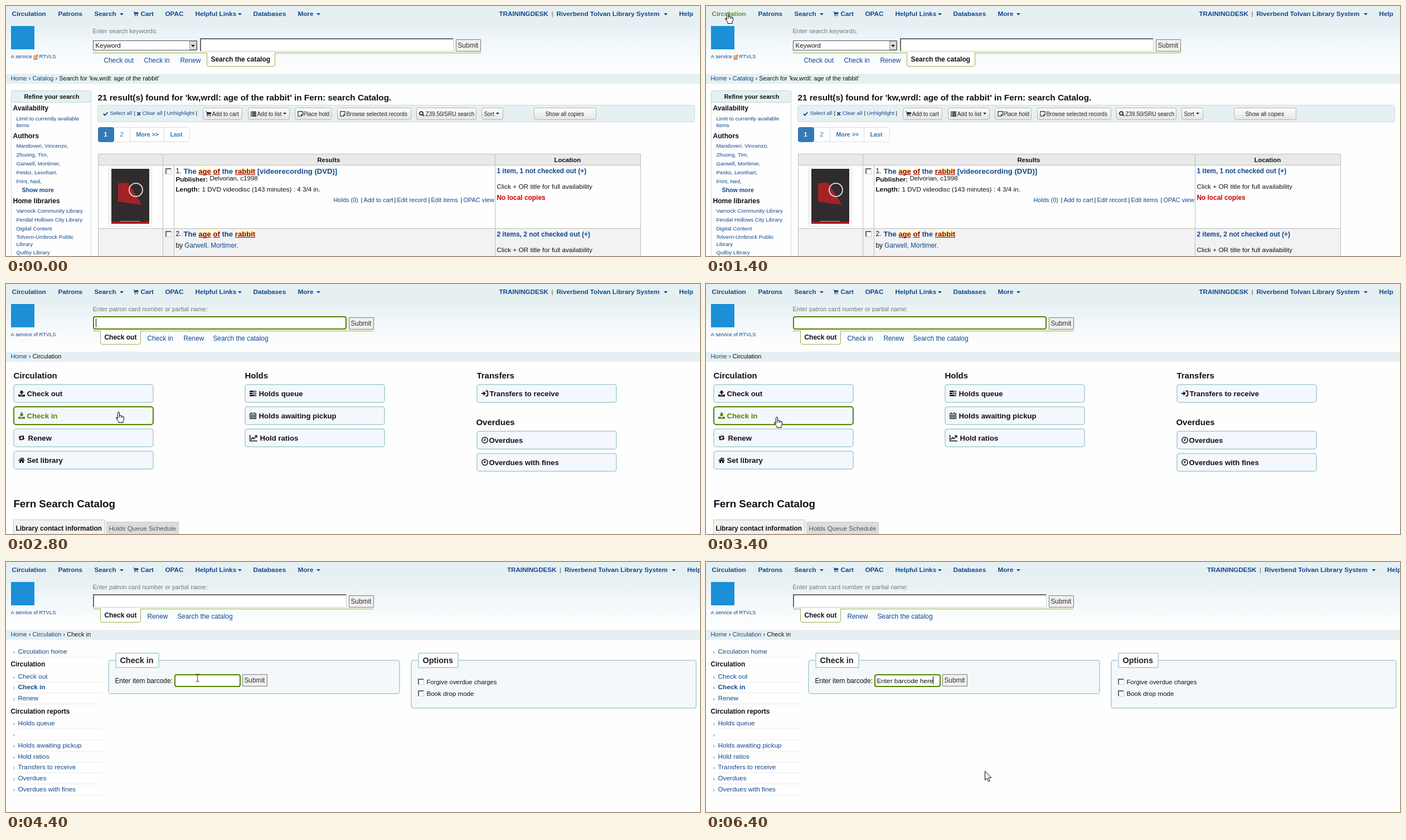
These frames come from a looping animation (1245 by 450 pixels, 6.6 s). An HTML page with a canvas:

```html
<!DOCTYPE html>
<html lang="en">
<head>
<meta charset="utf-8">
<title>Library check in</title>
<style>
html, body { margin: 0; width: 100%; height: 100%; overflow: hidden; background: #fefefe; }
canvas { display: block; }
</style>
</head>
<body>
<canvas id="stage" width="1245" height="450"></canvas>
<script>
const c = document.getElementById('stage').getContext('2d');
const LOOP = 6600, STEP = 200;
const LINK = '#10488c', GREEN = '#538200', INK = '#111', TEAL = '#b9d8d9', PALE = '#e6f0f2';

// Icons live in a 12 unit box: [path, stroke width or 0 for fill]
const ICONS = {
  check: ['M1 6L4.5 9.5L11 2.5', 2.6],
  cross: ['M2 2L10 10M10 2L2 10', 2.8],
  cart: ['M0 1H2.6L3 2.6H12V6.5L4 7.4L4.2 8.4H11V9.4H3.2L1.9 2H0ZM3.6 10H5.4V11.8H3.6ZM9 10H10.8V11.8H9Z', 0],
  list: ['M0 1H2V3H0ZM3 1H12V3H3ZM0 4H2V6H0ZM3 4H12V6H3ZM0 7H2V9H0ZM3 7H12V9H3ZM0 10H2V12H0ZM3 10H12V12H3Z', 0],
  note: ['M1 1H11V8L8 11H1ZM11 8H8V11', 1.3],
  search: ['M8.5 5a3.7 3.7 0 1 1-7.4 0a3.7 3.7 0 1 1 7.4 0M7.7 7.8L11 11', 2],
  upload: ['M6 0L10 4.5H7.5V8H4.5V4.5H2ZM0 8H3.5V9.3H8.5V8H12V11.5H0Z', 0],
  download: ['M4.5 0H7.5V3.5H10L6 8L2 3.5H4.5ZM0 8H3.5L6 10L8.5 8H12V11.5H0Z', 0],
  renew: ['M3 2L0 5.5H2V10H8L6.6 8.3H4V5.5H6ZM9 10L12 6.5H10V2H4L5.4 3.7H8V6.5H6Z', 0],
  home: ['M6 1L0 6.4L.8 7.2L6 2.7L11.2 7.2L12 6.4L10 4.6V1.8H8.6V3.4ZM6 3.6L2 7.2V11H5V8H7V11H10V7.2Z', 0],
  tasks: ['M0 1H12V3.6H0ZM7 1.8V2.8H11.2V1.8ZM0 4.7H12V7.3H0ZM5 5.5V6.5H11.2V5.5ZM0 8.4H12V11H0ZM8.5 9.2V10.2H11.2V9.2Z', 0],
  calendar: ['M.7 2H11.3V11.3H.7ZM.7 5H11.3M.7 8H11.3M4.2 4V11M7.8 4V11M3.5 0V3M8.5 0V3', 1.2],
  chart: ['M.6 1V11H12.8M2.2 8.5L5 5.5L7 7.5L11.5 2.8M8.6 2.4H11.8V5.6', 1.4],
  enter: ['M0 6H6M3.5 3L6.5 6L3.5 9M7.5 1.5H9.8Q11.3 1.5 11.3 3V9Q11.3 10.5 9.8 10.5H7.5', 1.8],
  clock: ['M11.2 6a5.2 5.2 0 1 1-10.4 0a5.2 5.2 0 1 1 10.4 0M6.3 3V6.6H3.8', 1.5]
};
const CURSORS = {
  hand: 'M-2 12V1.5Q-2 0 -.5 0Q1 0 1 1.5V7Q1 6 2.5 6Q4 6 4 7.5Q4 6.8 5.3 6.8Q6.6 6.8 6.6 8.3Q6.8 7.7 7.8 7.8Q9 8 9 9.3V13L7.5 16V19H-.5V17L-5 11Q-5.5 9.3 -4 9.3Z',
  arrow: 'M0 0V16L3.7 12.6L6.2 18.4L8.8 17.3L6.3 11.6H11.3Z',
  beam: 'M-3 -7Q0 -7 0 -5Q0 -7 3 -7M0 -5V6M-3 7Q0 7 0 5Q0 7 3 7'
};

function rect(x, y, w, h, fill) {
  c.fillStyle = fill;
  c.fillRect(x, y, w, h);
}

function box(x, y, x2, y2, fill, line, lw = 1, r = 0) {
  c.beginPath();
  c.roundRect(x + lw / 2, y + lw / 2, x2 - x - lw, y2 - y - lw, r);
  c.fillStyle = fill;
  c.fill();
  c.strokeStyle = line;
  c.lineWidth = lw;
  c.stroke();
}

// Draws text centred on y and returns its right edge
function text(s, x, y, size, color = INK, bold = false) {
  c.font = `${bold ? 'bold ' : ''}${size}px "Liberation Sans", Arial, sans-serif`;
  c.fillStyle = color;
  c.fillText(s, x - 0.6, Math.round(y + size * 0.35));
  return x + c.measureText(s).width;
}

function term(s, x, y, size, bold = true) {
  c.font = `${bold ? 'bold ' : ''}${size}px "Liberation Sans", Arial, sans-serif`;
  const w = c.measureText(s).width, h = size + 1;
  rect(x - 0.6, y - h / 2, w, h, '#ffffcc');
  text(s, x, y, size, '#990000', bold);
  rect(x - 0.6, Math.round(y + size * 0.35) + 1, w, 1, '#990000');
  return x + w;
}

function icon(name, x, y, size, color) {
  const [d, lw] = ICONS[name], p = new Path2D(d);
  c.save();
  c.translate(x, y - size / 2);
  c.scale(size / 12, size / 12);
  c.fillStyle = c.strokeStyle = color;
  c.lineWidth = lw;
  lw ? c.stroke(p) : c.fill(p, 'evenodd');
  c.restore();
}

function caret(x, y, color, w = 7) {
  c.beginPath();
  c.moveTo(x, y);
  c.lineTo(x + w, y);
  c.lineTo(x + w / 2, y + w / 2 + 0.3);
  c.fillStyle = color;
  c.fill();
}

function sunken(x, y, x2, y2) {
  rect(x, y, x2 - x, y2 - y, '#ccc');
  rect(x, y, x2 - x - 1, y2 - y - 1, '#666');
  rect(x + 2, y + 2, x2 - x - 3, y2 - y - 3, '#fff');
}

function field(x, y, x2, y2, focus) {
  focus ? box(x, y, x2, y2, '#fff', GREEN, 2, 3) : sunken(x, y, x2, y2);
}

function submit(x, y) {
  box(x, y, x + 45, y + 22, '#f0f0f0', '#7a7a7a');
  text('Submit', x + 4, y + 11, 11.9, '#333');
}

function checkbox(x, y) {
  sunken(x, y, x + 11, y + 11);
}

function header(page, hot) {
  const g = c.createLinearGradient(0, 0, 0, 115);
  g.addColorStop(0, '#e6f0f2');
  g.addColorStop(0.28, '#e6f0f3');
  g.addColorStop(0.62, '#f3f8fb');
  g.addColorStop(1, '#fefefe');
  rect(0, 0, 1245, 115, g);
  rect(0, 122, 1245, 18, PALE);
  [['Circulation', 11], ['Patrons', 94], ['Search', 159], ['Cart', 242], ['OPAC', 286],
   ['Helpful Links', 340], ['Databases', 444], ['More', 524]].forEach(([s, x], i) =>
    text(s, x, 14, 11.75, hot && !i ? '#6b8a26' : LINK, true));
  [204, 416, 557].forEach(x => caret(x, 13, LINK));
  icon('cart', 228, 14, 9.5, LINK);
  const dx = page === 2 ? 14.5 : 0;
  text('TRAININGDESK', 885 + dx, 14, 11.65, LINK, true);
  text('|', 979 + dx, 14, 11.65, '#555');
  text('Riverbend Tolvan Library System', 988 + dx, 14, 11.7, LINK, true);
  caret(1180 + dx, 13, LINK);
  text('Help', 1208 + dx, 14, 11.75, LINK, true);

  rect(9, 36, 42, 42, '#1c8fd6');
  let x = text('A service ', 9, 91, 9.3, LINK);
  x = page ? text('of', x, 91, 9.3, LINK) : term('of', x, 91, 9.3, false);
  text(' RTVLS', x, 91, 9.3, LINK);
}

// Search strip: its line, the open tab and the plain tabs
function tabs(right, open, others) {
  const [name, x, x2] = open, line = '#93b04a';
  rect(156, 84, right - 156, 1, line);
  c.beginPath();
  c.moveTo(x + 0.5, 84);
  c.lineTo(x + 0.5, 105);
  c.quadraticCurveTo(x + 0.5, 108.5, x + 4, 108.5);
  c.lineTo(x2 - 4, 108.5);
  c.quadraticCurveTo(x2 - 0.5, 108.5, x2 - 0.5, 105);
  c.lineTo(x2 - 0.5, 84);
  c.fillStyle = '#fefefe';
  c.fill();
  c.strokeStyle = line;
  c.lineWidth = 1;
  c.stroke();
  text(name, x + 8, 96, 12, INK, true);
  others.forEach(([s, tx]) => text(s, tx, 98, 11.9, LINK));
}

function crumbs(parts) {
  let x = 9;
  parts.forEach((s, i) => {
    const last = i === parts.length - 1;
    x = text(s, x, 130, 11, last ? INK : LINK);
    if (!last) x = text(' › ', x, 130, 11);
  });
}

function patronSearch(focus) {
  text('Enter patron card number or partial name:', 156, 45, 11.1, '#777');
  field(156, 58, 611, 82, focus);
  submit(615, 60);
}

function grayButton(x, x2, label, tx, ic) {
  const g = c.createLinearGradient(0, 183, 0, 205);
  g.addColorStop(0, '#fefefe');
  g.addColorStop(1, '#e4e4e4');
  box(x, 183, x2, 205, g, '#b4b4b4', 1, 3);
  if (ic) icon(ic, x + 5, 194, 10, '#222');
  return text(label, tx, 194, 10, '#222');
}

function cover() {
  box(184, 289, 262, 397, '#fff', '#ddd', 1, 4);
  rect(189, 293, 68, 99, '#302c2d');
  c.fillStyle = '#a32226';
  c.beginPath();
  c.moveTo(201, 319); c.lineTo(219, 318); c.lineTo(244, 358); c.lineTo(201, 352);
  c.fill();
  c.strokeStyle = '#d8d2d0';
  c.lineWidth = 2;
  c.beginPath();
  c.arc(233, 331, 12, 0, 7);
  c.stroke();
  rect(189, 388, 68, 4, '#a8181c');
  rect(204, 387, 36, 1, '#aaa');
}

function sidebar() {
  box(9, 152, 153, 460, '#fefefe', '#cfe0e2', 1, 4);
  box(9, 152, 153, 174, PALE, TEAL, 1, 3);
  text('Refine your search', 33, 163, 11, INK, true);
  [['Availability', 184], ['Authors', 234], ['Home libraries', 351]]
    .forEach(([s, y]) => text(s, 13, y, 12.15, INK, true));
  [['Limit to currently available', 203], ['items', 215],
   ['Mandoveri, Vincenzo,', 252], ['Zhuong, Tim,', 268], ['Garwell, Mortimer,', 284],
   ['Pesko, Leonhart,', 300], ['Frint, Ned,', 316],
   ['Varnock Community Library', 369], ['Fendal Hollows City Library', 385],
   ['Digital Content', 401], ['Tolvern-Umbrock Public', 416], ['Library', 429],
   ['Quilby Library', 444]].forEach(([s, y]) => text(s, 19, y, 9.75, LINK));
  text('Show more', 29, 331, 10.7, LINK, true);
}

function titleLine(n, y, tail) {
  const size = 13.1;
  let x = text(n, 305, y, 12);
  x = text('The ', 319, y, size, LINK, true);
  x = term('age', x, y, size);
  x = text(' ', x, y, size);
  x = term('of', x, y, size);
  x = text(' the ', x, y, size, LINK, true);
  x = term('rabbit', x, y, size);
  text(tail, x, y, size, LINK, true);
}

function results(s) {
  header(0, s.hot);
  text('Enter search keywords:', 156, 45, 11.1, '#777');
  box(156, 62, 343, 80, '#fff', '#555');
  text('Keyword', 161, 71, 11.7);
  box(329, 63, 342, 79, '#dcdcdc', '#999');
  caret(332, 70, '#000');
  field(348, 58, 803, 82);
  submit(807, 60);
  tabs(852, ['Search the catalog', 360, 483], [['Check out', 176], ['Check in', 248], ['Renew', 313]]);
  crumbs(['Home', 'Catalog', "Search for 'kw,wrdl: age of the rabbit'"]);
  sidebar();
  text("21 result(s) found for 'kw,wrdl: age of the rabbit' in Fern: search Catalog.", 165, 165, 15.3, INK, true);

  box(164, 178, 1236, 209, PALE, '#c4dddf', 1, 3);
  icon('check', 174, 194, 9, LINK);
  text('Select all', 187, 193, 9.8, LINK);
  text('|', 230, 193, 9.8);
  icon('cross', 234, 194, 8.5, LINK);
  text('Clear all', 245, 193, 9.8, LINK);
  text('|', 284, 193, 9.8);
  text('Unhighlight', 289, 193, 9.9, LINK);
  text('|', 341, 193, 9.8);
  grayButton(353, 424, 'Add to cart', 370, 'cart');
  grayButton(434, 509, 'Add to list', 451, 'list');
  caret(497, 192, '#222', 6);
  grayButton(518, 584, 'Place hold', 534, 'note');
  grayButton(594, 727, 'Browse selected records', 611, 'note');
  grayButton(736, 844, 'Z39.50/SRU search', 753, 'search');
  grayButton(853, 892, 'Sort', 858);
  caret(879, 192, '#222', 6);
  grayButton(947, 1059, 'Show all copies', 968);

  box(165, 218, 330, 245, '#fefefe', '#ddd', 1, 4);
  box(165, 218, 194, 245, '#337ab7', '#337ab7', 1, 3);
  rect(222, 219, 1, 25, '#ddd');
  rect(283, 219, 1, 25, '#ddd');
  text('1', 176, 231, 11, '#fff', true);
  text('2', 205, 231, 11, '#337ab7');
  text('More >>', 234, 231, 10.6, '#337ab7', true);
  text('Last', 295, 231, 10.8, '#337ab7', true);

  const line = '#bdbdbd';
  rect(165, 266, 974, 21, '#e9e9ea');
  rect(165, 401, 974, 49, '#f2f2f4');
  [266, 286, 400].forEach(y => rect(165, y, 974, 1, line));
  [165, 281, 877, 1138].forEach(x => rect(x, 266, 1, 184, line));
  rect(301, 287, 1, 163, line);
  text('Results', 559, 277, 11.3, INK, true);
  text('Location', 984, 277, 11.5, INK, true);
  cover();
  checkbox(286, 292);
  checkbox(286, 405);

  titleLine('1.', 297, ' [videorecording (DVD)]');
  text('Publisher:', 305, 312, 11.8, INK, true);
  text('Delvorian, c1998', 366, 310, 11.5);
  text('Length:', 305, 330, 11.8, INK, true);
  text('1 DVD videodisc (143 minutes) : 4 3/4 in.', 352, 330, 11.7);
  [['Holds (0)', 588], ['Add to cart', 642], ['Edit record', 702], ['Edit items', 763], ['OPAC view', 821]]
    .forEach(([t, x], i) => {
      text(t, x, 349, 11, LINK);
      if (i) text('|', x - 5, 349, 11);
    });
  titleLine('2.', 410, '');
  const x = text('by ', 305, 431, 11.9);
  text('Garwell, Mortimer.', x, 431, 11.9, LINK);

  text('1 item, 1 not checked out (+)', 881, 297, 11.95, LINK, true);
  text('Click + OR title for full availability', 881, 325, 11.8);
  text('No local copies', 881, 345, 11.9, '#c00', true);
  text('2 items, 2 not checked out (+)', 881, 411, 11.95, LINK, true);
  text('Click + OR title for full availability', 881, 439, 11.8);
}

// [x, y, height, label, icon, label x]
const MENU = [
  [13, 180, 34, 'Check out', 'upload', 38], [13, 220, 34, 'Check in', 'download', 38],
  [13, 260, 34, 'Renew', 'renew', 40], [13, 300, 34, 'Set library', 'home', 38],
  [428, 180, 34, 'Holds queue', 'tasks', 454], [428, 220, 34, 'Holds awaiting pickup', 'calendar', 454],
  [428, 260, 34, 'Hold ratios', 'chart', 456],
  [844, 180, 34, 'Transfers to receive', 'enter', 868],
  [844, 264, 34, 'Overdues', 'clock', 867], [844, 304, 34, 'Overdues with fines', 'clock', 867]
];
const over = ([x, y, h], p) => p[0] > x && p[0] < x + 252 && p[1] > y && p[1] < y + h;

function circulation(s) {
  header(1, s.hot);
  patronSearch(s.t < 3600);
  if (s.blink) rect(161, 62, 1, 16, '#000');
  tabs(659, ['Check out', 169, 242], [['Check in', 254], ['Renew', 319], ['Search the catalog', 372]]);
  crumbs(['Home', 'Circulation']);
  [['Circulation', 14, 165], ['Holds', 429, 165], ['Transfers', 845, 165], ['Overdues', 844, 249]]
    .forEach(([t, x, y]) => text(t, x, y, 15, INK, true));
  MENU.forEach(m => {
    const [x, y, h, label, ic, tx] = m, hot = over(m, s.pos), color = hot ? GREEN : INK;
    box(x, y, x + 252, y + h, '#f4f8fe', hot ? GREEN : TEAL, 2, 4);
    icon(ic, x + 9, y + 17, ic === 'chart' ? 13 : 12, color);
    text(label, tx, y + 17, 13.2, color, true);
  });
  text('Fern Search Catalog', 14, 395, 18.8, INK, true);
  box(13, 424, 178, 460, '#f3f1ee', '#c6c6c6');
  text('Library contact information', 18, 440, 11.9, INK, true);
  box(180, 428, 310, 460, '#dcdcde', '#cacaca');
  text('Holds Queue Schedule', 185, 440, 11.75, '#555');
}

function panel(x, x2, y2, title, lx, lx2) {
  box(x, 176, x2, y2, '#f4f8fb', TEAL, 2, 4);
  box(lx, 163, lx2, 191, '#fefefe', TEAL, 2, 2);
  text(title, lx + 9, 177, 14.45, '#222', true);
}

function checkIn(s) {
  header(2);
  patronSearch(false);
  tabs(659, ['Check out', 169, 242], [['Renew', 254], ['Search the catalog', 308]]);
  crumbs(['Home', 'Circulation', 'Check in']);
  text('Circulation', 9, 184, 11.85, INK, true);
  text('Circulation reports', 9, 269, 11.85, INK, true);
  [['Circulation home', 161], ['Check out', 206], ['Check in', 225], ['Renew', 245],
   ['Holds queue', 290], ['', 310], ['Holds awaiting pickup', 330], ['Hold ratios', 350],
   ['Transfers to receive', 369], ['Overdues', 389], ['Overdues with fines', 409]]
    .forEach(([t, y]) => {
      text('›', 13, y + 1, 11, '#777');
      text(t, 22, y, 11.8, LINK, t === 'Check in');
      rect(21, y + 10, 151, 1, '#ebebeb');
    });

  panel(183, 707, 238, 'Check in', 196, 275);
  text('Enter item barcode:', 196, 214, 11.85);
  field(302, 202, 421, 225, true);
  const end = text('Enter barcode here'.slice(0, s.typed), 307, 214, 11.8);
  if (s.typed) rect(Math.round(end - 0.5), 206, 1, 14, '#000');
  submit(424, 202);
  panel(726, 1239, 264, 'Options', 739, 812);
  checkbox(739, 210);
  checkbox(739, 231);
  text('Forgive overdue charges', 755, 216, 11.4);
  text('Book drop mode', 755, 237, 11.6);
}

const smooth = k => k * k * (3 - 2 * k);

// Interpolates [time, value...] keys
function track(keys, t, ease = smooth) {
  const i = keys.findIndex(k => k[0] > t);
  if (i === 0) return keys[0].slice(1);
  if (i < 0) return keys[keys.length - 1].slice(1);
  const a = keys[i - 1], b = keys[i], k = ease((t - a[0]) / (b[0] - a[0]));
  return a.slice(1).map((v, j) => v + (b[j + 1] - v) * k);
}

const MOUSE = [[600, 300, 230], [1400, 39, 12], [2200, 39, 12], [2800, 202, 230], [3400, 127, 239], [4200, 127, 239]];
const MOUSE_IN_FORM = [[4400, 343, 208], [4600, 343, 208], [5200, 500, 376]];
const TYPING = [[4800, 0], [5400, 6], [5600, 6], [6400, 18]];

function pointer(kind, [x, y]) {
  const p = new Path2D(CURSORS[kind]);
  c.save();
  c.translate(Math.round(x) + 0.5, Math.round(y) + 0.5);
  c.lineWidth = 1;
  c.lineJoin = 'round';
  c.strokeStyle = kind === 'beam' ? '#333' : '#000';
  c.fillStyle = '#fff';
  if (kind !== 'beam') c.fill(p);
  c.stroke(p);
  if (kind === 'hand') c.stroke(new Path2D('M1 7V10M4 8V10.5M6.6 8.5V10.5'));
  c.restore();
}

function draw(t) {
  const page = t < 2000 ? 0 : t < 4400 ? 1 : 2;
  const pos = track(page === 2 ? MOUSE_IN_FORM : MOUSE, t);
  const hot = t >= 600 && pos[0] < 75 && pos[1] < 24;
  const state = {
    t, pos, hot,
    blink: t >= 2400 && t < 3000,
    typed: Math.round(track(TYPING, t, k => k)[0])
  };
  rect(0, 0, 1245, 450, '#fefefe');
  [results, circulation, checkIn][page](state);
  if (t < 600) return;
  const inField = page === 2 && t <= 4600;
  const onLink = hot || page === 1 && MENU.some(m => over(m, pos));
  pointer(inField ? 'beam' : onLink ? 'hand' : 'arrow', pos);
}

const start = performance.now();
function tick() {
  const t = (performance.now() - start) % LOOP;
  draw(Math.floor(t / STEP) * STEP);
  requestAnimationFrame(tick);
}
tick();
</script>
</body>
</html>
```
